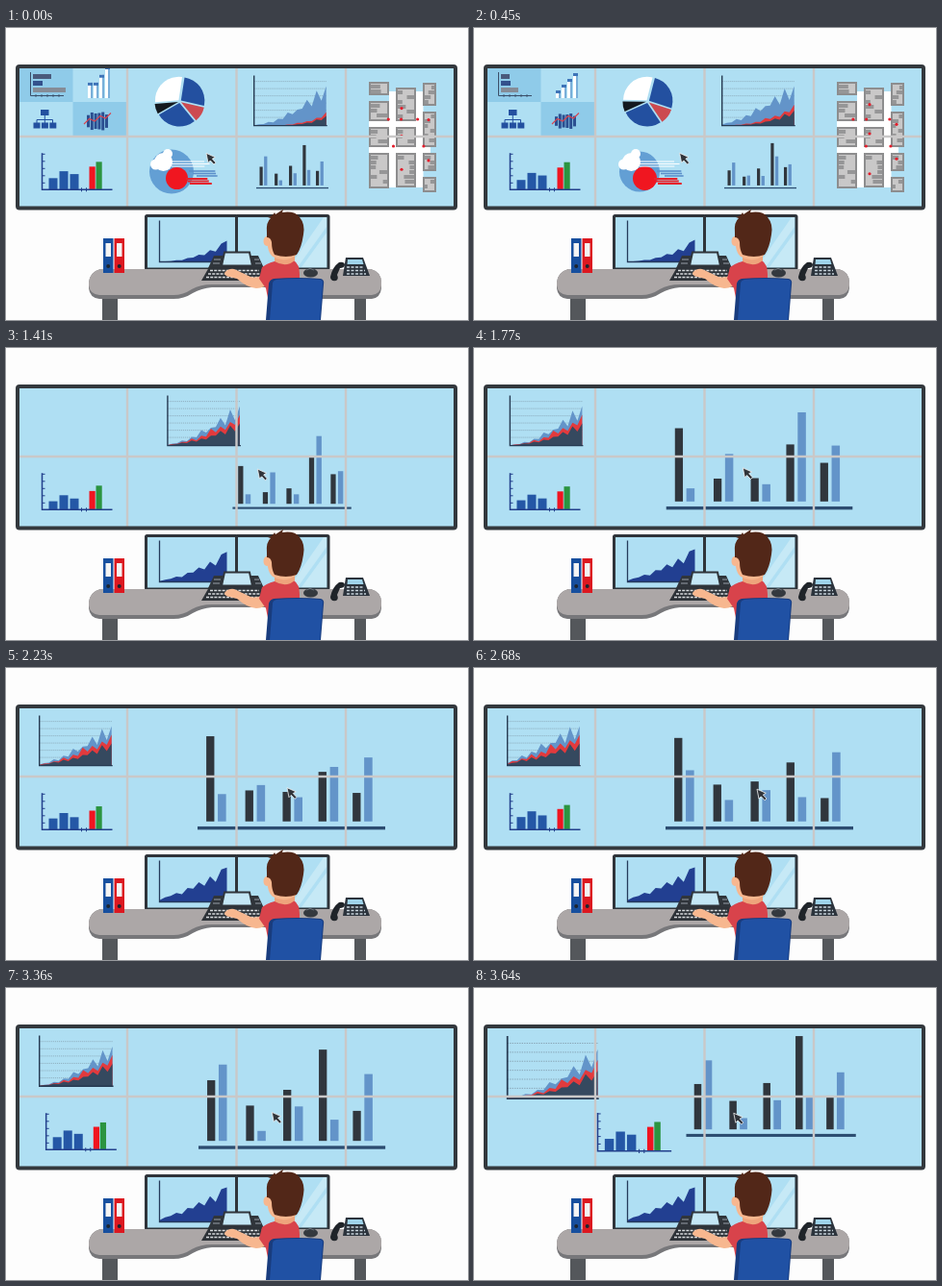
Recreate the animation shown at these times as an HTML page with a canvas. Size 480 by 304 pixels, loop 3.69 s.

```html
<!DOCTYPE html>
<html lang="en">
<head>
<meta charset="utf-8">
<title>Control room</title>
<style>
html, body { margin: 0; width: 100%; height: 100%; overflow: hidden; background: #fdfdfd; }
svg, canvas { position: absolute; left: 0; top: 0; width: 480px; height: 304px; display: block; }
</style>
</head>
<body>
<svg viewBox="0 0 480 304">
  <rect x="12" y="40" width="455" height="147" fill="#afdff3"/>
  <path d="M182 255l3-4h22l3 4z" fill="#3b3f45"/>
  <g fill="#afdff3" stroke="#2f343a" stroke-width="3">
    <rect x="145.500" y="195.500" width="94" height="55.500" rx="1"/>
    <rect x="239.500" y="195.500" width="95.500" height="55.500" rx="1"/>
  </g>
  <path d="M307 249l26-36v36zM294 249l36-52h3v10l-30 42z" fill="#c6e9f6"/>
</svg>

<canvas id="c" width="480" height="304"></canvas>

<svg viewBox="0 0 480 304">
  <path d="M126 41v146M239.500 41v146M353 41v146M13 113h453" stroke="#c9c8c8" stroke-width="2.400" fill="none"/>
  <rect x="12" y="40" width="455" height="147.500" rx="2" fill="none" stroke="#33383d" stroke-width="4"/>
  <path id="cursor" d="M0 0l2 10 2.300-2.300 3.700 4 2-1.800-3.700-4 3-1.700z" fill="#30343a" stroke="#f4f4f4" stroke-width=".8"/>

  <!-- desk -->
  <path d="M100 279h16v25h-16zM362 279h12v25h-12z" fill="#54575b"/>
  <path d="M98 251h281q11 3 11 14v6q-1 10-10 11h-62V270H214q-11 1-20 6-9 6-20 6H97q-10-1-11-11v-6q1-11 12-14z" fill="#77777a"/>
  <path d="M98 251h281q11 3 11 14v3q-1 9-10 10h-62V267H214q-12 0-21 5-9 6-19 6H97q-10-1-11-10v-3q1-11 12-14z" fill="#aca7a7"/>

  <!-- binders -->
  <path d="M101 219h10.500v36H101z" fill="#174f9e"/>
  <path d="M112.500 219H123v36h-10.500z" fill="#dc1820"/>
  <path d="M103.500 224h5.500v14h-5.500zM115 224h5.500v14H115z" fill="#f4f4f4"/>
  <g fill="#1c2530"><circle cx="106.200" cy="248" r="2"/><circle cx="117.700" cy="248" r="2"/></g>

  <!-- console and keyboard -->
  <path d="M216 237h46l6 13h-58z" fill="#30353b"/>
  <path d="M216 241h7M215 245h7M258 241h5M259 245h6" stroke="#747b82" stroke-width="1.500"/>
  <path d="M227 233.500h26l3 14h-32z" fill="#c3e6f5" stroke="#30353b" stroke-width="2"/>
  <path d="M211 249h54l4 14h-66z" fill="#2d3238"/>
  <path d="M212 252.500h51M210 256h54M208 259.500h56" stroke="#d7dadd" stroke-width="1.400" stroke-dasharray="3 1.200"/>

  <!-- mouse and phone -->
  <ellipse cx="316.500" cy="255" rx="7.500" ry="4.500" fill="#34393f"/>
  <path d="M312 252q4-3 8 0" stroke="#70767d" fill="none"/>
  <path d="M353 239h18l7 19h-28z" fill="#2b333c"/>
  <path d="M355 241h15l1.500 5h-17z" fill="#9fd3ea"/>
  <path d="M354 249h18M354 252.500h19M354 256h20" stroke="#c8d4dc" stroke-width="1.600" stroke-dasharray="3 1.500"/>
  <path d="M346 244q6-1 6 3-1 3-5 3l-3 7q2 4-1 6-6 1-6-4 2-10 9-15z" fill="#1f2429"/>

  <!-- operator -->
  <path d="M271 255q-9 6-17 4l-17-8q-6-1-10 4 0 3 5 4l8 2q10 9 20 10 9 0 15-7z" fill="#f7b78f"/>
  <path d="M266 249q8-6 19-7h14q6 4 6 14v25h-33l-2-10-7-10z" fill="#d8434b"/>
  <path d="M279 234h21v8q-9 8-21 1z" fill="#eea47c"/>
  <path d="M273 211q-4 20 4 27 12 7 24-1l5-20z" fill="#f7b78f"/>
  <ellipse cx="271" cy="222" rx="3.500" ry="5" fill="#f7b78f"/>
  <path d="M271 213q-1-11 4-15l-3-1q5-1 7-5l1 2q6-4 8-5l-1 3q13-2 18 5 6 7 4 18-2 14-7 21-11 4-23 0-3-5-3-13-1-5-5-5z" fill="#522718"/>
  <path d="M278 261q25-2 49 0 4 1 3 6l-3 37h-57l3-38q1-4 5-5z" fill="#183c7e"/>
  <path d="M281 262q23-2 46 0 3 1 2 5l-3 37h-52l3-38q0-3 4-4z" fill="#2051a4"/>
</svg>

<script>
const LOOP = 3690, TAU = Math.PI * 2;
const NAVY = '#2350a0', BLUE = '#6394c9', DARK = '#30363d', RED = '#e23a3d';
const g = document.getElementById('c').getContext('2d');
const cursor = document.getElementById('cursor');

const clamp = x => Math.max(0, Math.min(1, x));
const ease = x => (x = clamp(x), x < .5 ? 2 * x * x : 1 - 2 * (1 - x) ** 2);
const mix = (a, b, p) => a + (b - a) * p;
const noise = n => { const s = Math.sin(n * 12.9898) * 43758.5453; return s - Math.floor(s); };
const wave = (t, mean, swing, peak, period = LOOP) => mean + swing * Math.cos(TAU * (t - peak) / period);

function box(x, y, w, h, color) {
  g.fillStyle = color;
  g.fillRect(x, y, w, h);
}
function disc(x, y, r, color) {
  g.fillStyle = color;
  g.beginPath();
  g.arc(x, y, r, 0, TAU);
  g.fill();
}
function line(points, color, width = 1) {
  g.strokeStyle = color;
  g.lineWidth = width;
  g.beginPath();
  points.forEach(p => g.lineTo(...p));
  g.stroke();
}
function place(x, y, scale, draw) {
  g.save();
  g.translate(x, y);
  g.scale(scale, scale);
  draw();
  g.restore();
}
const around = (x, y, scale, draw) => place(x, y, scale, () => { g.translate(-x, -y); draw(); });

function ridge(w, h, pow, color, seed, n = 15) {
  g.fillStyle = color;
  g.beginPath();
  g.moveTo(0, 0);
  for (let i = 0; i <= n; i++) {
    const u = i / n, jag = i < n ? .6 + .3 * (i % 2) + .25 * noise(i + seed) : 1;
    g.lineTo(u * w, -h * jag * (.1 + .9 * u) ** pow);
  }
  g.lineTo(w, 0);
  g.fill();
}
function areaChart(t) {
  g.setLineDash([1, 1]);
  for (let y = -46; y < -8; y += 7.5) line([[0, y], [75, y]], '#8199a8', .7);
  g.setLineDash([]);
  const grow = clamp(t / 1050), bend = wave(t, 1.5, -.4, 2680, 1820);
  ridge(75, 41, bend, BLUE, 3);
  ridge(75, mix(14, 32, grow), bend + 2 * (1 - grow), RED, 21);
  ridge(75, mix(10, 23, grow), bend + 2.5 * (1 - grow), '#35495f', 42);
  line([[0, -52], [0, 0], [76, 0]], '#263a52', 1.4);
}
function pairChart(t) {
  const dark = [25, 11, 15, 32, 15], blue = [18, 12, 10, 25, 24], swing = [13, 8, 4, 19, 4];
  for (let i = 0; i < 5; i++) {
    const x = 3.5 + 15.9 * i - .32 * i * i;
    const a = wave(t, dark[i], dark[i] * .38, 2400 + 550 * i);
    const b = wave(t, blue[i], swing[i], 3490 + 1700 * i);
    box(x, -2.6 - a, 3.2, a, DARK);
    box(x + 4.6, -2.6 - b, 3.3, b, BLUE);
  }
  box(0, -.6, 75, 1.3, '#2c4c70');
}
function columnChart(t) {
  [11, 17.5, 14, 21.5, 26.5].forEach((mean, i) => {
    const h = wave(t, mean, 2.5, 3000 + 200 * i);
    if (i < 3) box(7 + 11 * i, -h, 9, h, '#2457a6');
    else box(28 + 7 * i, -h, 6.2, h, i < 4 ? '#f01420' : '#2b9440');
  });
  line([[0, -38], [0, 0], [73, 0]], '#23408c', 1.5);
  for (let y = -37; y < -2; y += 7.5) line([[0, y], [3, y]], '#23408c');
  for (const x of [41, 46]) line([[x, -2], [x, 2]], '#23408c');
}
function tiles(t) {
  const settle = clamp(t / 450);
  box(14, 42, 55.5, 35, '#8fcbe9');
  box(69.5, 77, 56, 35, '#8fcbe9');
  // horizontal bars
  box(28, 48, mix(19, 9, settle), 5, '#4a5a7c');
  box(28, 55, 10, 5, '#33518c');
  box(28, 62, mix(34, 18, settle), 5, '#858c97');
  line([[25.5, 46], [25.5, 70.5], [60, 70.5]], '#3b4e68');
  for (let x = 31; x < 61; x += 6) line([[x, 69], [x, 72]], '#3b4e68', .8);
  // rising columns
  for (let i = 0; i < 4; i++) {
    const x = 85 + i * 6, h = 8 + i * 6 + 13 * noise(i + 6) * (1 - settle);
    box(x, 73 - h, 5, h, '#fff');
    box(x + 3, 73 - h, 2, h, '#79afd9');
    box(x, 73 - h, 5, 3, '#3e74b8');
  }
  // organisation chart
  box(36, 85, 8.5, 6, NAVY);
  line([[40.3, 90], [40.3, 99]], NAVY);
  line([[32, 99], [32, 95.5], [48.5, 95.5], [48.5, 99]], NAVY);
  for (let i = 0; i < 3; i++) box(28.5 + i * 8.4, 98.5, 7, 6, NAVY);
  // floating columns with a trend
  const trend = [];
  for (let i = 0; i < 6; i++) {
    const h = 9 + 11 * noise(i + 2) + 3 * (1 - settle);
    box(84 + i * 3.8, 97 - h / 2, 3, h, '#2b4f91');
    trend.push([81 + i * 5.6, 98 - i * 1.5 + (i % 2 ? -2 : 2)]);
  }
  line(trend, '#d94450', 1.1);
}
function pie(t) {
  const turn = .1 * Math.sin(t / 330);
  const tint = [NAVY, '#cc4a50', NAVY, '#14191f', '#fff'];
  let a = -1.42;
  [1.64, .66, 1.74, .44, 1.8].forEach((span, i) => {
    const m = a + turn + span / 2, x = 180.5 + 1.6 * Math.cos(m), y = 76.5 + 1.6 * Math.sin(m);
    g.fillStyle = tint[i];
    g.beginPath();
    g.moveTo(x, y);
    g.arc(x, y, 24.5, a + turn, a + turn + span);
    g.fill();
    a += span;
  });
}
function bubbles(t) {
  const s = 2 * Math.sin(t / 290), settle = clamp(t / 450);
  disc(172, 149.5, 23 - 2 * settle, '#639fd4');
  disc(163.5, 139.5, 9.5, '#fff');
  disc(155.5, 142, 5.5, '#fff');
  disc(168, 131, 5, '#fff');
  disc(177.5, 156.5, 11.5 + settle, '#f01620');
  for (let i = 0; i < 3; i++) {
    const y = i * 2.5;
    line([[172, 139 + y], [206 + 6 * noise(i) + s, 139 + y]], '#fff', 1.2);
    line([[190 + i * 4, 149 + y], [214 + 9 * noise(i + 4) - s, 149 + y]], '#5b8fca', 1.6);
    line([[187 + i * 2, 157 + y], [207 + 7 * noise(i + 8) + s, 157 + y]], '#e5242d', 2);
  }
}
function block(x, y, w, h, seed) {
  box(x, y, w, h, '#8d8d8e');
  box(x + 2, y + 2, w - 4, h - 4, '#c9c8c8');
  for (let j = 2; j < h - 6; j += 5) {
    const room = (w - 4) * (.25 + .4 * noise(seed + j));
    box(x + 2 + (w - 4 - room) * (noise(seed * 3 + j) > .5), y + j + 1, room, 4, '#969697');
  }
}
function plan(t) {
  for (const x of [398, 426]) box(x, 66, 7.5, 100, '#fff');
  for (const y of [96, 123]) box(377, y, 64, 7, '#fff');
  const gap = 6;
  [[56, 76, 103, 130, 173], [62, 103, 130, 172], [57, 87, 130, 155, 177]].forEach((ys, col) => {
    for (let i = 1; i < ys.length; i++)
      block(377 + 28 * col, ys[i - 1], col < 2 ? 21 : 14, ys[i] - ys[i - 1] - gap, col * 40 + i * 9);
  });
  for (let i = 0; i < 10; i++) {
    const drift = 5 * Math.sin(t / 450 + i * 2);
    if (i % 2) disc(397 + 14 * (i % 4), 70 + i * 9 + drift, 1.6, '#e31d2b');
    else disc(380 + 58 * noise(i + 11) + drift, 95 + 14 * (i % 4), 1.6, '#e31d2b');
  }
}

function draw(t) {
  g.clearRect(0, 0, 480, 304);
  const shrink = 1 - ease((t - 920) / 500);
  const move = ease((t - 1070) / 760);
  const back = clamp((t - 3285) / 355) ** 2;

  g.globalAlpha = shrink ** 2;
  around(69.5, 77, shrink, () => tiles(t));
  around(180, 76, shrink, () => pie(t));
  around(186, 149, shrink, () => bubbles(t));
  around(412, 113, shrink, () => plan(t));
  g.globalAlpha = 1;

  place(mix(37.5, 128.5, back), mix(168.3, 169.8, back), 1 + .05 * back, () => columnChart(t));
  place(mix(mix(260, 199, move), 220.5, back), mix(166.5, 153.3, back),
    mix(mix(1, 2.6, move), 2.35, back), () => pairChart(t));
  place(mix(257.7, 34.7, move), mix(101.6, 115, back), 1 + .25 * back, () => areaChart(t));

  const rise = ease(t / 2400);
  place(159.5, 243.5, 1, () => {
    ridge(70, mix(22, 36, rise), mix(2.2, 1.1, rise), '#223f91', 60, 12);
    line([[0, -43], [0, 0], [72, 0]], '#253b5c', 1.3);
  });

  const x = 208 + 86 * ease(t / 2500) - 25 * ease((t - 2680) / 1100);
  cursor.setAttribute('transform', `translate(${x} ${wave(t, 127.5, 3, 200)})`);
}
function tick() {
  draw(performance.now() % LOOP);
  requestAnimationFrame(tick);
}
tick();
</script>
</body>
</html>
```
